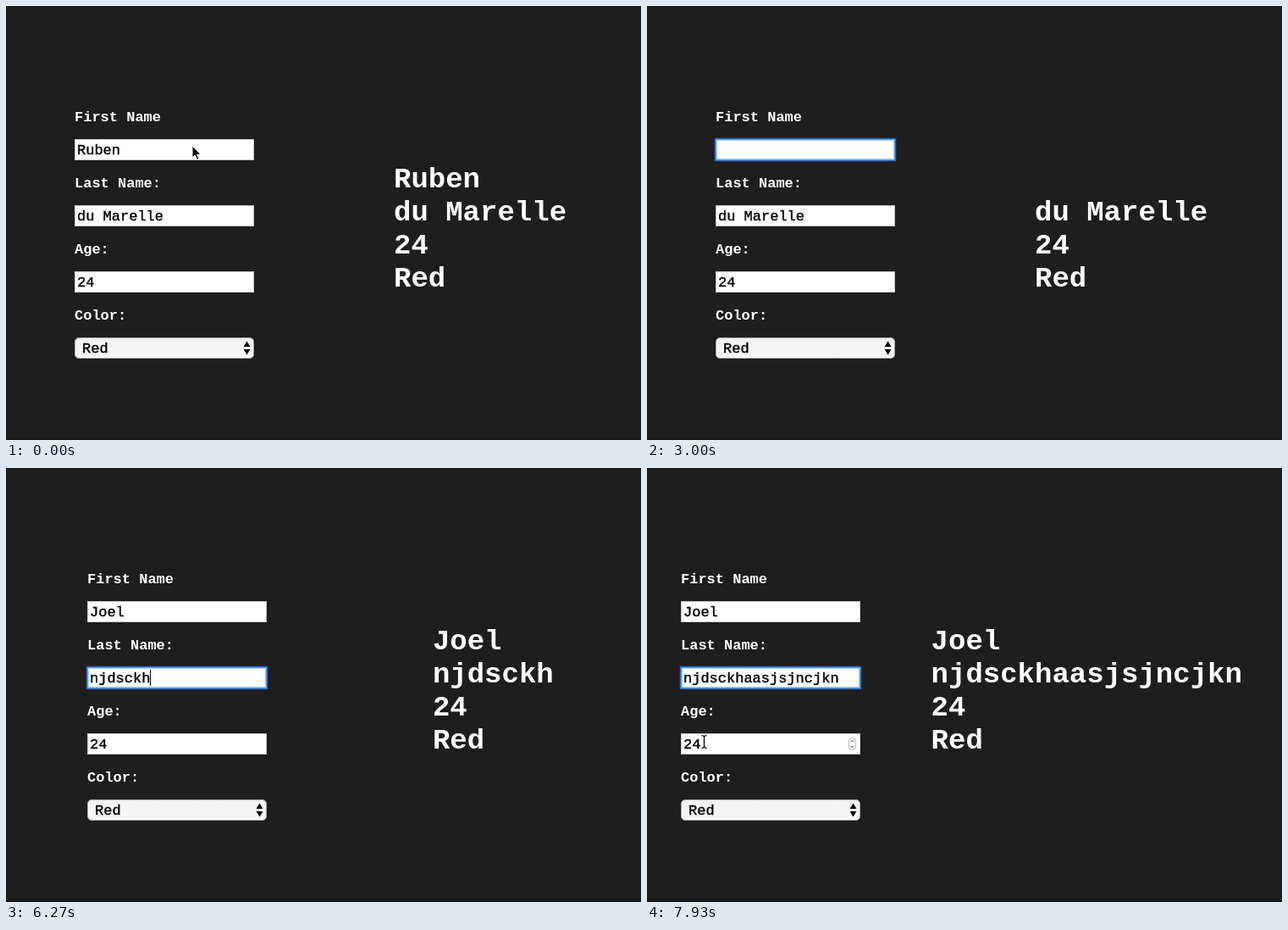
Animation, 750 px wide and 512 px high, one loop 8 s. Source, as an HTML page with a canvas:

```html
<!DOCTYPE html>
<html lang="en">
<head>
<meta charset="utf-8">
<title>Live form</title>
<style>
html, body { margin: 0; width: 100%; height: 100%; overflow: hidden; background: #1e1e1e; }
canvas { display: block; }
</style>
</head>
<body>
<canvas width="750" height="512"></canvas>
<script>
const LOOP = 8000, FIELD_W = 212, FIELD_H = 25, SMALL = 17, BIG = 34, ADVANCE = 0.6;
const ROWS = [157, 235, 313, 391];
const LABELS = ['First Name', 'Last Name:', 'Age:', 'Color:'];
const OLD_FIRST = 'Ruben', NEW_FIRST = 'Joel';
const OLD_LAST = 'du Marelle', NEW_LAST = 'njdsckhaasjsjncjkn';

// Key presses and clicks, in ms
const every = (start, step, n) => Array.from({ length: n }, (_, i) => start + i * step);
const CLICK_1 = 870, CLICK_2 = 4850, CLEAR = 5460;
const ERASE = every(2000, 120, OLD_FIRST.length);
const TYPE_1 = [3470, 3740, 3860, 3990];
const TYPE_2 = every(5866, 66, NEW_LAST.length);
const ACTIONS = [CLICK_1, ...ERASE, ...TYPE_1, CLICK_2, CLEAR, ...TYPE_2];

// Pointer: time, x, y; it is hidden between the paths
const PATHS = [
  [[0, 220, 165], [1850, 220, 165]],
  [[4600, 220, 172], [CLICK_2, 205, 247], [5300, 4, 249], [CLEAR, 4, 249]],
  [[7200, 16, 250], [7800, 67, 323], [LOOP, 67, 323]]
];

const ctx = document.querySelector('canvas').getContext('2d');
const count = (times, t) => times.filter(k => k <= t).length;

function values(t) {
  const typed = count(TYPE_1, t);
  return [
    typed ? NEW_FIRST.slice(0, typed) : OLD_FIRST.slice(0, OLD_FIRST.length - count(ERASE, t)),
    t < CLEAR ? OLD_LAST : NEW_LAST.slice(0, count(TYPE_2, t)),
    '24',
    'Red'
  ];
}

// The large text refreshes at a fixed interval
const synced = t => values(Math.floor((t - 55) / 270) * 270 + 55);

function pointer(t) {
  const path = PATHS.find(p => t >= p[0][0] && t < p[p.length - 1][0]);
  if (!path) return null;
  const i = path.findIndex(p => p[0] > t);
  const [t0, x0, y0] = path[i - 1], [t1, x1, y1] = path[i];
  const u = (t - t0) / (t1 - t0), e = u * u * (3 - 2 * u);
  return { x: x0 + (x1 - x0) * e, y: y0 + (y1 - y0) * e };
}

function text(str, x, y, size, weight = 'bold') {
  ctx.font = `${weight} ${size}px "Liberation Mono", "Courier New", monospace`;
  ctx.fillText(str, x, y);
}

function boldText(str, x, y, size) {
  ctx.fillStyle = '#fff';
  text(str, x, y, size);
}

// Medium weight: regular letters with a thin outline
function valueText(str, x, y) {
  ctx.fillStyle = ctx.strokeStyle = '#000';
  ctx.lineWidth = 0.4;
  text(str, x, y, SMALL, 'normal');
  ctx.strokeText(str, x, y);
}

function rect(x, y, w, h, color) {
  ctx.fillStyle = color;
  ctx.fillRect(x, y, w, h);
}

function poly(points, color) {
  ctx.beginPath();
  points.forEach(([x, y]) => ctx.lineTo(x, y));
  ctx.closePath();
  ctx.fillStyle = color;
  ctx.fill();
}

function field(x, y, focused) {
  const rings = focused
    ? [[-2, '#1f3048'], [-1, '#2c69b4'], [0, '#5c9ff0'], [1, '#a9cdf9'], [2, '#fff']]
    : [[0, '#c8c8c8'], [1, '#fff']];
  for (const [inset, color] of rings) {
    ctx.beginPath();
    ctx.roundRect(x + inset, y + inset, FIELD_W - 2 * inset, FIELD_H - 2 * inset, Math.max(0, -inset));
    ctx.fillStyle = color;
    ctx.fill();
  }
}

function select(x, y) {
  const fill = ctx.createLinearGradient(0, y, 0, y + FIELD_H);
  fill.addColorStop(0, '#f2f2f2');
  fill.addColorStop(1, '#f7f7f7');
  ctx.beginPath();
  ctx.roundRect(x + 0.5, y + 0.5, FIELD_W - 1, FIELD_H - 1, 4.5);
  ctx.fillStyle = fill;
  ctx.fill();
  ctx.strokeStyle = '#a8a8a8';
  ctx.lineWidth = 1;
  ctx.stroke();
  const cx = x + 203.5;
  poly([[cx - 4, y + 11], [cx, y + 4.5], [cx + 4, y + 11]], '#000');
  poly([[cx - 4, y + 14], [cx, y + 20.5], [cx + 4, y + 14]], '#000');
}

function spinner(x, y) {
  ctx.beginPath();
  ctx.roundRect(x + 198.5, y + 5.5, 8, 14, 4);
  ctx.lineWidth = 1;
  ctx.strokeStyle = '#b5b5b5';
  ctx.stroke();
  ctx.beginPath();
  for (const d of [-1, 1]) {
    ctx.moveTo(x + 200.5, y + 12.5 + d * 2.5);
    ctx.lineTo(x + 202.5, y + 12.5 + d * 4.5);
    ctx.lineTo(x + 204.5, y + 12.5 + d * 2.5);
  }
  ctx.strokeStyle = '#444';
  ctx.stroke();
}

function arrow(x, y) {
  const shape = [[0, 0], [0, 14], [3.2, 11], [5.7, 16.5], [8, 15.5], [5.6, 10.3], [10, 10]];
  poly(shape.map(([a, b]) => [x + a, y + b]), '#000');
  ctx.strokeStyle = '#fff';
  ctx.lineWidth = 1;
  ctx.stroke();
}

function beam(x, y) {
  ctx.beginPath();
  for (const d of [-1, 1]) {
    ctx.moveTo(x - 3, y + d * 7.5);
    ctx.quadraticCurveTo(x, y + d * 7.5, x, y + d * 5);
    ctx.quadraticCurveTo(x, y + d * 7.5, x + 3, y + d * 7.5);
  }
  ctx.moveTo(x, y - 6);
  ctx.lineTo(x, y + 6);
  for (const [color, width] of [['#fff', 2.6], ['#000', 1.2]]) {
    ctx.strokeStyle = color;
    ctx.lineWidth = width;
    ctx.stroke();
  }
}

function draw(t) {
  rect(0, 0, 750, 512, '#191919');
  rect(1, 1, 748, 509, '#1e1e1e');

  const now = values(t), shown = synced(t), mouse = pointer(t);
  const width = Math.max(...shown.map(s => s.length)) * BIG * ADVANCE;
  const space = (740 - FIELD_W - width) / 4, left = Math.round(space);
  const start = left + 3, step = SMALL * ADVANCE;
  const focus = t < CLICK_1 ? -1 : t < CLICK_2 ? 0 : 1;
  const dragging = t >= CLICK_2 && t < CLEAR;
  const over = y => mouse && mouse.x >= left && mouse.x <= left + FIELD_W &&
    mouse.y >= y && mouse.y <= y + FIELD_H;

  ROWS.forEach((y, i) => {
    boldText(LABELS[i], left, y - 21, SMALL);
    if (i === 3) {
      select(left, y);
      valueText(now[i], left + 9, y + 18);
      return;
    }
    field(left, y, i === focus);
    const end = now[i].length;
    let from = end;
    if (dragging && i === 1) {
      from = Math.max(0, Math.min(end, Math.round((mouse.x - start) / step)));
      rect(start + from * step, y + 3, (end - from) * step, 19, '#b3d7fe');
    }
    valueText(now[i], start, y + 18);
    if (i === focus && from === end) {
      const last = Math.max(...ACTIONS.filter(k => k <= t));
      if ((t - last) % 1000 < 500) rect(Math.round(start + end * step), y + 3, 1, 19, '#000');
    }
    if (i === 2 && over(y)) spinner(left, y);
  });

  shown.forEach((s, i) => boldText(s, 3 * space + 215, 214 + 39 * i, BIG));

  if (mouse) {
    const onText = t > 500 && ROWS.slice(0, 3).some(over);
    if (dragging || onText) beam(mouse.x + 0.5, mouse.y + (t < 2000 ? 5 : 0));
    else arrow(mouse.x, mouse.y);
  }
}

const begin = performance.now();
function tick() {
  draw((performance.now() - begin) % LOOP);
  requestAnimationFrame(tick);
}
tick();
</script>
</body>
</html>
```
